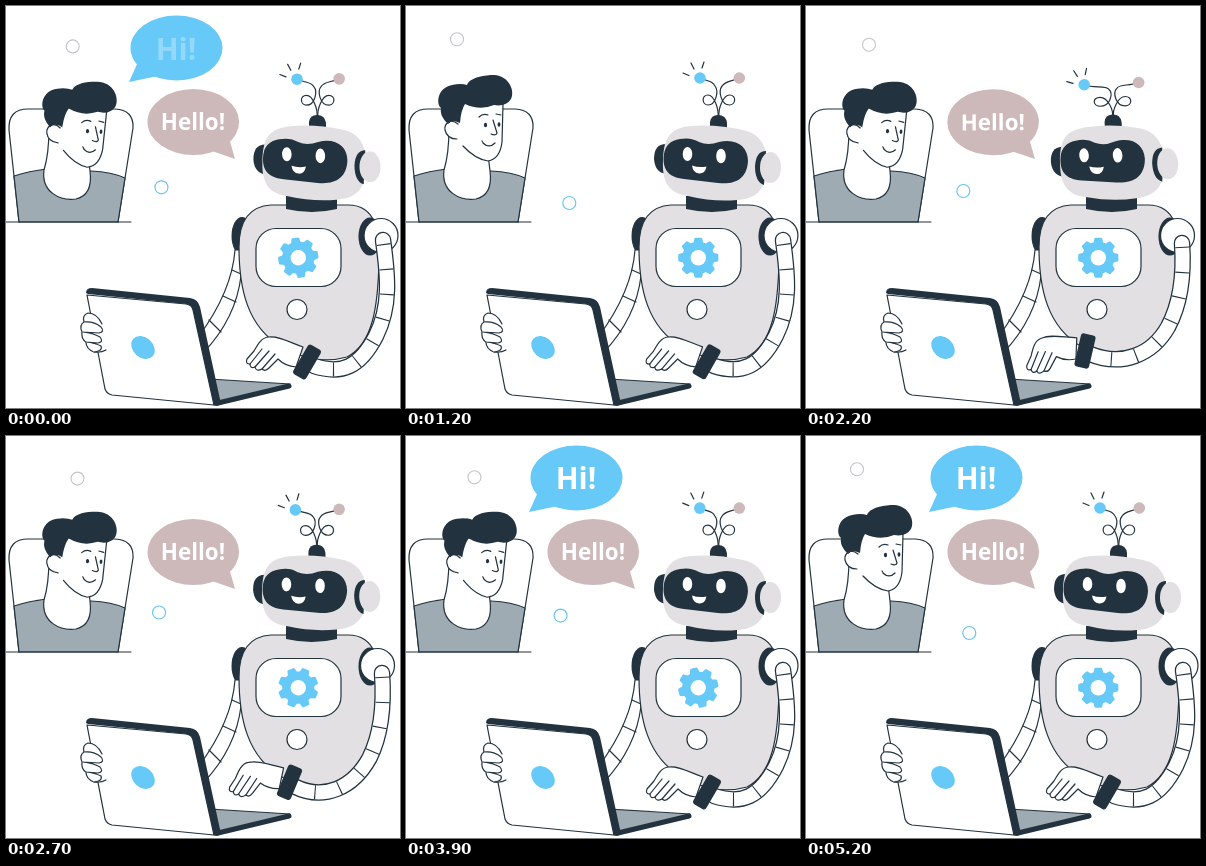
Animation of 394 by 402 pixels, one loop 5300 ms. Source, as an HTML page:

```html
<!DOCTYPE html>
<html lang="en">
<head>
<meta charset="utf-8">
<title>Robot chat</title>
<style>
  html, body { margin: 0; height: 100%; overflow: hidden; background: #fff; }
  svg { display: block; width: 100vw; height: 100vh; }
  text { font-family: "Open Sans", sans-serif; font-weight: 700; fill: #fff; text-anchor: middle; }
  .ink { fill: #22323e; }
  .line { fill: none; stroke: #22323e; stroke-width: 1.2; stroke-linecap: round; stroke-linejoin: round; }
  .white { fill: #fff; }
  .gray { fill: #e2e0e3; }
  .slate { fill: #9eabb3; }
  .blue { fill: #66c9f8; }
  .pink { fill: #cdb8ba; }
</style>
</head>
<body>
<svg viewBox="0 0 394 402">
  <circle id="dotGray" r="6.5" fill="none" stroke="#c4c4ca" stroke-width="1.1"/>
  <circle id="dotBlue" r="6.5" fill="none" stroke="#6cc4f2" stroke-width="1.2"/>

  <g id="hi">
    <path class="blue" d="M132 56L123 76L152 70Z"/>
    <ellipse class="blue" cx="170.5" cy="42" rx="46" ry="32.5"/>
    <text id="hiText" x="170" y="53.5" font-size="30">Hi!</text>
  </g>
  <g id="hello">
    <path class="pink" d="M206 145L229 153L223 132Z"/>
    <ellipse class="pink" cx="187.3" cy="116" rx="45.8" ry="33"/>
    <text x="187" y="124" font-size="22.4">Hello!</text>
  </g>

  <g id="man">
    <path class="line white" d="M13 216L3 124Q2 103 22 103H109Q128 104 127 122L112 216"/>
    <path class="line slate" d="M13 216L8 170Q23 165 41 163L85 165Q106 166 119 172L112 216Z"/>
    <path class="line white" d="M43 122Q43 148 38 164C35 187 55 195 70 193Q87 189 84 165L81 140Z"/>
    <path class="line" d="M0 216H125"/>
    <g id="manHead">
      <path class="white" d="M44 98H97L96 136Q94 153 82 155Q62 152 52 135L44 130Z"/>
      <path class="line" d="M97 98L96 136Q94 153 82 155Q69 153 57 140"/>
      <path class="line white" d="M52 118C45 112 38 117 39 124Q41 133 51 133"/>
      <path class="ink" d="M42 118C36 112 34 107 35 102C30 98 31 82 46 79Q55 77 61 79C64 71 80 69 88 69C104 70 109 86 105 93Q100 101 88 99Q74 105 59 98Q55 104 54 117Q46 113 42 118Z"/>
      <ellipse class="ink" cx="79.5" cy="119" rx="1.6" ry="2.2"/>
      <ellipse class="ink" cx="93" cy="118.500" rx="1.4" ry="2.2"/>
      <path class="line" d="M73 111Q77 107 82 109M90 108L95 109M87 114L91 127Q90 130 85 128M77 137Q83 143 89 137M76 135L78 138"/>
    </g>
  </g>

  <g id="robot">
    <ellipse class="ink" cx="236" cy="230" rx="10.5" ry="19"/>
    <path class="line white" d="M229 244Q226 285 193 330L198 346Q230 312 235 270L234 244Z"/>
    <path class="line" d="M226 264L235 268M217 290L230 296M203 314L215 326"/>
    <path class="line gray" d="M265 199H342C371 199 374 228 373 255C372 300 367 338 341 351Q309 360 276 341C241 321 233 282 233 241Q233 201 265 199Z"/>
    <path class="ink" d="M280 190H331V203Q306 209 280 203Z"/>
    <rect class="line white" x="250" y="222.500" width="85" height="58" rx="20"/>
    <g id="gear">
      <path id="gearShape" class="blue" stroke="#66c9f8" stroke-width="2.500" stroke-linejoin="round"/>
      <circle class="white" r="7.700"/>
    </g>
    <circle class="line white" cx="291" cy="303.500" r="10"/>

    <g id="sparks"><path class="line" d="M-17 -5L-11 -2.500M-9 -15L-6 -9M4 -16L2 -10"/></g>
    <path id="wireBlue" class="line"/>
    <path id="wirePink" class="line"/>
    <circle id="tipBlue" class="blue" r="5.800"/>
    <circle id="tipPink" class="pink" r="5.800"/>
    <g id="head">
      <path class="ink" d="M304 122V116Q305 109 312 109Q320 109 321 117V123Z"/>
      <path class="ink" d="M260 138Q248 138 248 153Q249 167 261 168Z"/>
      <path class="gray" d="M285 120Q311 118 337 124C356 128 362 143 361 161C360 185 349 193 331 194Q307 196 282 190C262 187 256 176 257 154C258 130 265 122 285 120Z"/>
      <path class="ink" d="M360 145Q350 145 349 160Q349 176 358 179Z"/>
      <ellipse class="gray" cx="364.500" cy="161.500" rx="10.500" ry="15.500"/>
      <path class="ink" d="M274 133Q285 131 293 136Q302 140 313 136C331 132 342 141 342 155C341 173 329 179 312 177L278 173C261 171 256 162 258 148Q260 135 274 133Z"/>
      <ellipse class="white" cx="281.500" cy="148" rx="4.800" ry="7"/>
      <ellipse class="white" cx="315" cy="150" rx="4.800" ry="7.300"/>
      <path class="white" d="M286 159.500Q293 162 300.500 160.500Q299 168 293 167.500Q287 167 286 159.500Z"/>
    </g>

    <ellipse class="ink" cx="364" cy="230.500" rx="11.500" ry="19"/>
    <circle id="shoulder" class="line white" r="17"/>
    <path id="armEdge" class="line" style="stroke-width:16.500"/>
    <path id="armFill" class="line" style="stroke-width:14;stroke:#fff"/>
    <path id="armTicks" class="line" style="stroke-width:14;stroke-linecap:butt" stroke-dasharray="1.100 24" stroke-dashoffset="-29"/>
  </g>

  <g id="laptop">
    <path class="slate" d="M203 373L284 378L211 396Z"/>
    <path class="line" d="M203 373L284 378"/>
    <path class="line" style="stroke-width:5" d="M212 397L283 380"/>
    <path class="ink" d="M80 287Q80 282 86 282L184 292Q192 293 194 301L215 398Q210 402 206 398L186 303Q184 299 180 298L82 288Z"/>
    <path class="line white" d="M81 289L180 298Q186 299 187 304L208 399L106 389Q101 388 99 383Z"/>
    <ellipse class="blue" rx="13" ry="10" transform="translate(137 341.500) rotate(42)"/>
    <path class="line white" d="M96 318Q91 307 82 307Q76 309 78 316Q73 319 76 326Q75 333 80 336Q80 343 88 346Q95 347 100 344"/>
    <path class="line white" d="M78 316Q88 315 95 321Q99 326 93 327L77 326M77 326Q87 327 94 331Q98 336 92 337L80 336M80 336Q89 337 95 340Q97 345 88 346"/>
  </g>

  <g id="hand">
    <path class="line white" d="M-4 -15C-18 -20 -28 -26 -38 -25C-45 -25 -49 -18 -53 -11L-60 -3Q-62 2 -57 2Q-57 7 -52 5Q-51 10 -45 7Q-42 10 -38 6L-29 -3Q-22 4 -11 5Z"/>
    <path class="line" d="M-57 2L-45 -13M-52 5L-38 -11M-45 7L-32 -8"/>
    <rect class="ink" x="-7.500" y="-17" width="15" height="34" rx="3" transform="rotate(30)"/>
  </g>
</svg>
<script>
const $ = id => document.getElementById(id);
const set = (id, attrs) => { for (const k in attrs) $(id).setAttribute(k, attrs[k]); };
const clamp = x => Math.min(1, Math.max(0, x));
const mix = (a, b, k) => a + (b - a) * k;
const ease = (t, from, to) => { const k = clamp((t - from) / (to - from)); return k * k * (3 - 2 * k); };
const wave = (t, period) => Math.cos(2 * Math.PI * (t - 1200) / period);
const LOOP = 5300, STEP = 100;

// Arm curve (7 points), then cuff x, y, angle and shoulder x
const rest = [377,234, 382,270, 385,300, 370,330, 354,361, 336,369, 308,360, 301,356, 30, 375];
const reach = [376,237, 378,265, 376,295, 362,321, 346,349, 316,361, 284,348, 279,345, 13, 371.5];
const lift = [376,237, 378,265, 378,295, 365,323, 348,355, 320,369, 293,353, 288,347.5, 32, 371.5];
const armKeys = [[1150, 1800, rest, reach], [2300, 3100, reach, lift], [3100, 3600, lift, rest]];

const gearPoints = [];
for (let i = 0; i < 8; i++)
  for (const [offset, r] of [[-.25, 15], [-.14, 19], [.14, 19], [.25, 15]]) {
    const a = i * Math.PI / 4 + offset;
    gearPoints.push((r * Math.cos(a)).toFixed(2) + " " + (r * Math.sin(a)).toFixed(2));
  }
set("gearShape", { d: "M" + gearPoints.join("L") + "Z" });

function drawArm(t) {
  let pose = rest;
  for (const [from, to, a, b] of armKeys)
    if (t >= from) pose = a.map((v, i) => mix(v, b[i], ease(t, from, to)));
  const d = `M${pose.slice(0, 2)}C${pose.slice(2, 8)} ${pose.slice(8, 14)}`;
  for (const id of ["armEdge", "armFill", "armTicks"]) set(id, { d });
  set("hand", { transform: `translate(${pose[14]} ${pose[15]}) rotate(${pose[16] - 30})` });
  set("shoulder", { cx: pose[17], cy: 229.5 });
}

// Curled wire from the cap to a tip; side is 1 for left, -1 for right
function wire(id, x, y, side, tipX, tipY) {
  const wide = .6 + Math.abs(tipX - x) / 45, high = .4 + (y - tipY) / 65;
  const p = (dx, dy) => `${x + side * dx * wide} ${y + dy * high} `;
  set(id, { d: `M${p(0, 0)}C${p(1, -8)}${p(-4, -22)}${p(-10, -22)}C${p(-17, -22)}${p(-16, -12)}${p(-10, -12)}` +
    `C${p(-2, -12)}${p(1, -26)}${p(-3, -31)}C${p(-6, -36)}${tipX + side * 10} ${tipY + 4} ${tipX} ${tipY}` });
}

function drawHead(t) {
  const k = (1 - wave(t, 4000 / 3)) / 2;
  const bx = mix(294, 262.5, k), by = mix(72, 86.5, k) - 2 * k * (1 - k);
  const px = mix(333.3, 332, k), py = mix(72, 81, k);
  const capX = mix(312, 301, k);
  set("head", { transform: `rotate(${-7 * k} 302 205)` });
  set("tipBlue", { cx: bx, cy: by });
  set("tipPink", { cx: px, cy: py });
  set("sparks", { transform: `translate(${bx} ${by}) rotate(${-12 * k})` });
  wire("wireBlue", capX, 111, 1, bx, by);
  wire("wirePink", capX + 1, 111, -1, px, py);
}

// Bubble fades early in the loop, then pops out of its tail with a small swing
function bubble(id, t, x, y, side, fade, pop) {
  const age = t - pop;
  const scale = age < 0 ? 1 : ease(age, 0, 220);
  const swing = age < 0 ? 0 : -8 * side * Math.cos((age - 200) / 110) * Math.exp(-Math.max(0, age - 200) / 130);
  set(id, {
    opacity: age < 0 ? 1 - ease(t, fade, fade + 400) : 1,
    transform: `translate(${x} ${y}) rotate(${swing}) scale(${scale}) translate(${-x} ${-y})`
  });
}

function draw(t) {
  const float = wave(t, 4000);
  set("dotGray", { cx: 63 - 12 * float, cy: 38.7 - 5.5 * float });
  set("dotBlue", { cx: 157.3 + 6 * float, cy: 185 + 12 * float });

  const tilt = 1 - ease(t, 0, 450) + ease(t, 1300, 2000) - ease(t, 3900, 4400);
  set("manHead", { transform: `translate(${2 * tilt} ${5 * tilt}) rotate(${4.5 * tilt} 65 120)` });

  bubble("hi", t, 123, 76, 1, 50, 2900);
  bubble("hello", t, 229, 153, -1, 200, 1600);
  set("hiText", { opacity: t < 2900 ? .3 : 1 });

  set("gear", { transform: `translate(292.300 251.700) rotate(${(t - 1200) * .045})` });
  drawHead(t);
  drawArm(t);
}

function frame() {
  const t = performance.now() % LOOP;
  draw(Math.floor(t / STEP) * STEP);
  requestAnimationFrame(frame);
}
frame();
</script>
</body>
</html>
```
